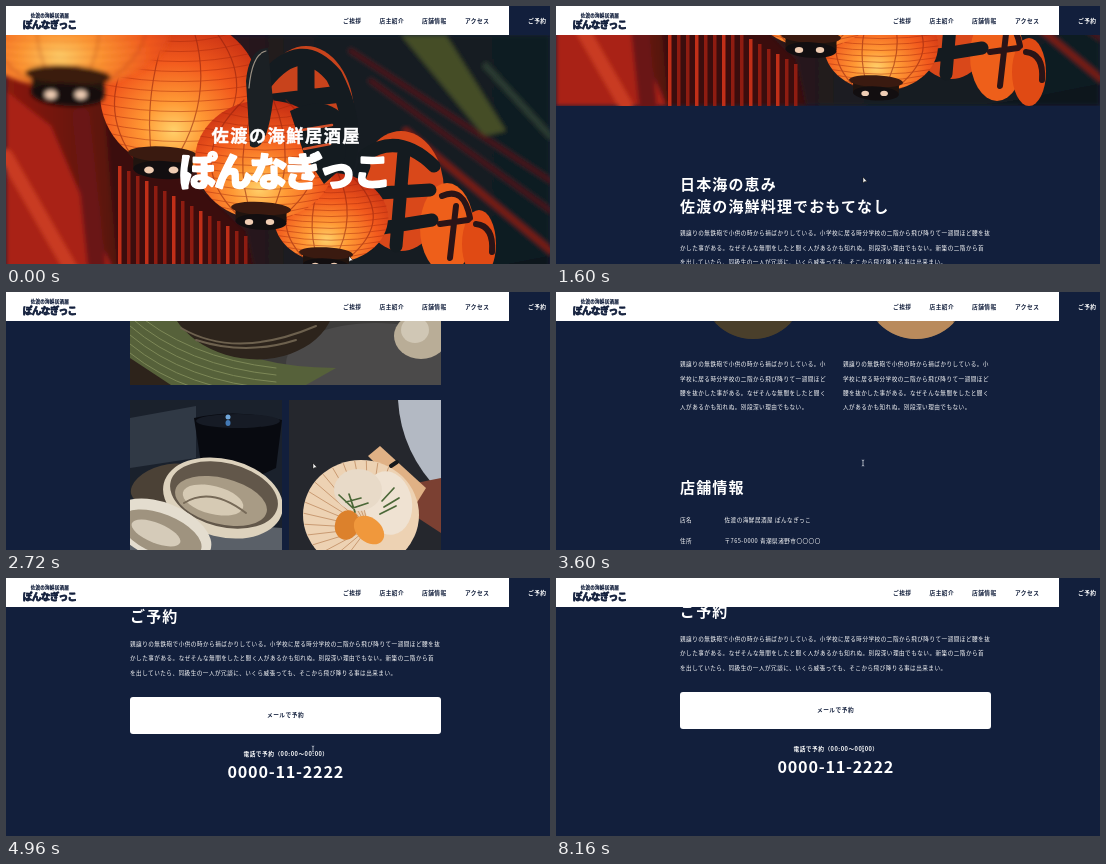
These frames come from a looping animation (544x258 px, 8240 ms). An HTML page:

```html
<!DOCTYPE html>
<html lang="ja">
<head>
<meta charset="utf-8">
<style>
html, body { margin: 0; width: 100%; height: 100%; overflow: hidden; background: #121f3c; }
svg { display: block; width: 544px; height: 258px; }
text { font-family: 'Noto Sans CJK JP', 'Noto Sans CJK', 'Noto Sans', sans-serif; white-space: pre; }
</style>
</head>
<body>
<svg id="stage" viewBox="0 0 544 258"></svg>
<script>
const NAVY = '#121f3c', WHITE = '#fff';
const SHOP = 'ぽんなぎっこ', KIND = '佐渡の海鮮居酒屋';
const STORY = '親譲りの無鉄砲で小供の時から損ばかりしている。小学校に居る時分学校の二階から飛び降りて一週間ほど腰を抜' +
  'かした事がある。なぜそんな無闇をしたと聞く人があるかも知れぬ。別段深い理由でもない。新築の二階から首' +
  'を出していたら、同級生の一人が冗談に、いくら威張っても、そこから飛び降りる事は出来まい。';

// y is the vertical middle of the glyphs
const text = (x, y, str, size = 5.6, gap = .49, weight = 500, fill = WHITE, stroke = 0) =>
  `<text x="${x}" y="${y + size * .38}" font-size="${size}" letter-spacing="${gap}" font-weight="${weight}"
    fill="${fill}" stroke="${fill}" stroke-width="${stroke}" stroke-linejoin="round">${str}</text>`;
const title = (y, str) => text(124, y, str, 15, 1.15, 700);
const ellipse = (x, y, rx, ry, fill, turn = 0) =>
  `<ellipse cx="${x}" cy="${y}" rx="${rx}" ry="${ry}" fill="${fill}" transform="rotate(${turn} ${x} ${y})"/>`;
const rect = (x, y, w, h, fill, extra = '') =>
  `<rect x="${x}" y="${y}" width="${w}" height="${h}" fill="${fill}" ${extra}/>`;
const shape = (d, fill) => `<path d="${d}" fill="${fill}"/>`;
const line = (d, color, width) =>
  `<path d="${d}" fill="none" stroke="${color}" stroke-width="${width}" stroke-linecap="round"/>`;
const soft = (blur, body) => `<g filter="url(#blur${blur})">${body}</g>`;
const clip = (id, outline, body) =>
  `<clipPath id="${id}">${outline}</clipPath><g clip-path="url(#${id})">${body}</g>`;
const lines = (x, y, cuts) =>
  cuts.slice(1).map((end, i) => text(x, y + i * 14.45, STORY.slice(cuts[i], end))).join('');
const repeat = (n, f) => Array.from({ length: n }, (_, i) => f(i)).join('');

function lantern(x, y, rx, ry, baseX, baseY, baseR) {
  const ribs = repeat(15, i => {
    const k = (i - 7) / 7.6, half = rx * Math.sqrt(1 - k * k), top = y + k * ry;
    return line(`M${x - half} ${top}Q${x} ${top + ry * .2} ${x + half} ${top}`, '#a3250c', .8);
  });
  const seams = [-.75, -.3, .3, .75].map(k =>
    line(`M${x + k * rx * .4} ${y - ry}Q${x + k * rx * 1.6} ${y} ${baseX + k * baseR} ${baseY}`, '#8d1f0d', 1.2)).join('');
  const lights = [-.4, .3].map(k =>
    ellipse(baseX + baseR * k, baseY + baseR * .2, baseR * .14, baseR * .1, '#f0cdb4')).join('');
  return ellipse(x, y, rx, ry, 'url(#glow)') + `<g opacity=".55">${ribs}${seams}</g>` +
    rect(baseX - baseR * .85, baseY - baseR * .3, baseR * 1.7, baseR * .5, '#20140f') +
    ellipse(baseX, baseY - baseR * .25, baseR, baseR * .22, '#3a1a10', 3) +
    ellipse(baseX, baseY + baseR * .2, baseR * .85, baseR * .26, '#120e10', 3) + lights;
}

function hero() {
  const slats = repeat(15, i => rect(112 + i * 9, 160 + i * 5, 3.5, 115, i % 3 ? '#8e1c11' : '#c02f18'));
  const back = rect(0, 29, 544, 243, 'url(#night)') +
    shape('M395 29L440 29L500 125L478 130Z', '#454d28') + line('M480 60L544 130', '#2c3a30', 7) +
    line('M345 45L545 175M365 75L545 205', '#4a171b', 5) + line('M400 125L545 245', '#7a1a17', 6) +
    shape('M0 85L45 120L110 272L0 272Z', '#a92417') + line('M0 150L70 272', '#c93a24', 14) +
    line('M75 110L92 272', '#6b1712', 18) + shape('M98 95L240 225L250 272L112 272Z', '#3a0f10') +
    shape('M430 272L544 250L544 272Z', '#0d151b');
  const marks = '#141b20';
  const right = ellipse(395, 185, 43, 60, '#d9481a') + ellipse(441, 222, 27, 45, '#ee5f1a') +
    ellipse(473, 238, 17, 34, '#e04a14') + ellipse(300, 108, 48, 68, '#c8431c') +
    line('M259 75Q295 30 328 70M268 96L335 88M300 52L300 165M268 125L338 118M328 70Q354 120 338 165', marks, 17) +
    line('M358 150Q392 125 428 160M356 188L424 184M398 145L390 240M358 160Q338 205 362 240M376 222L426 214', marks, 13) +
    line('M436 190Q458 180 464 212M434 218L462 214M450 200L444 252M470 218Q488 220 486 246', '#2a1417', 6);
  const front = lantern(174, 88, 80, 76, 157, 157, 35) + lantern(325, 212, 57, 45, 320, 254, 27) +
    lantern(259, 154, 70, 60, 255, 210, 30) +
    shape('M240 75Q243 42 262 42L267 95Q260 150 244 140Z', '#1b2024') + line('M243 82Q246 48 260 45', '#9c9285', 1.2) +
    shape('M284 105Q325 85 343 118L338 160L318 178L298 148Z', marks) +
    line('M290 125L326 119M298 143L324 138', '#d2502a', 2.5);
  return clip('heroBox', rect(0, 29, 544, 243, WHITE),
    soft(3, back) + soft(1, slats + right + front) + soft(3, lantern(62, 22, 103, 60, 62, 80, 43))) +
    text(205.5, 129, KIND, 17.2, 1.5, 900, WHITE, .5) +
    text(173, 165, SHOP, 38, -2.8, 900, WHITE, 2.6);
}

function dishes() {
  const veins = repeat(7, i => line(`M124 ${580 + i * 9}Q180 ${630 + i * 8} 270 ${640 + i * 7}`, '#7d8857', 1));
  const wide = rect(124, 450, 311, 207, '#3d3c3b') + ellipse(370, 635, 90, 40, '#4b4a4a') +
    shape('M124 540Q190 640 330 640L300 657L150 657L124 635Z', '#56613a') + veins +
    shape('M124 630L165 657L124 657Z', '#2d231b') +
    ellipse(245, 565, 85, 66, '#2d241c', 8) + ellipse(245, 548, 66, 42, '#8d806b', 12) +
    ellipse(248, 545, 48, 26, '#c3b59d', 12) + line('M175 600Q230 632 310 598M190 612Q240 628 290 612', '#6d614e', 2) +
    ellipse(415, 608, 27, 23, '#b9ad97') + ellipse(409, 602, 14, 13, '#d0c7b5');
  const oyster = rect(124, 672, 152, 152, '#1a212c') + shape('M124 690L190 678L190 730L124 740Z', '#303945') +
    shape('M188 690Q230 680 276 692L270 740Q230 762 195 735Z', '#080a10') + ellipse(232, 693, 42, 7, '#161b25') +
    ellipse(222, 689, 2.5, 2.5, '#6fa6da') + ellipse(222, 695, 2.5, 3, '#4379b5') +
    shape('M124 790L276 800L276 824L124 824Z', '#5a6068') + ellipse(160, 757, 36, 20, '#4b4136', -15) +
    ellipse(217, 770, 61, 39, '#ddd2bd', 14) + ellipse(218, 767, 55, 32, '#62574a', 14) +
    ellipse(215, 773, 47, 23, '#a89b85', 14) + ellipse(207, 772, 31, 14, '#d6cab4', 14) +
    line('M178 775Q205 758 240 785', '#776a58', 2) +
    ellipse(156, 803, 52, 28, '#e4ddcf', 22) + ellipse(155, 806, 43, 20, '#9f937f', 22) +
    ellipse(150, 805, 26, 10, '#d5cbb9', 22);
  const ridges = repeat(17, i => {
    const a = Math.PI * (.62 + i * .065);
    return line(`M362 800L${355 + 57 * Math.cos(a)} ${787 + 54 * Math.sin(a)}`, '#c99a72', 1);
  });
  const scallop = rect(283, 672, 152, 152, '#25272d') + shape('M392 672L435 672L435 765Q395 725 392 672Z', '#b3b9c3') +
    shape('M400 757L435 750L435 805L412 790Z', '#7b4032') + shape('M362 728L374 718L420 760L410 776Z', '#e0b185') +
    ellipse(355, 787, 58, 55, '#edd2b3') + ridges + ellipse(382, 775, 24, 32, '#efe2d2', -10) +
    ellipse(352, 762, 24, 21, '#e8dac8') + ellipse(341, 797, 12, 15, '#dc812c', 15) +
    ellipse(363, 802, 17, 12, '#f0983c', 40) +
    line('M333 767L347 780L362 775M343 766L349 784M340 774L355 770M376 773L388 760M378 779L393 770M374 786L390 778', '#4c6838', 1.7) +
    line('M385 738L391 734', '#15171b', 4);
  return clip('wide', rect(124, 450, 311, 207, WHITE), soft(1, wide)) +
    clip('left', rect(124, 672, 152, 152, WHITE), soft(1, oyster)) +
    clip('right', rect(283, 672, 152, 152, WHITE), soft(1, scallop));
}

function owner(x, id, wall, cloth) {
  return clip(id, ellipse(x, 987, 52, 52, WHITE), rect(x - 52, 935, 104, 104, wall) +
    soft(1, ellipse(x, 972, 17, 21, '#8c6650') + ellipse(x, 1035, 40, 38, cloth)));
}

function page() {
  const rows = [['店名', KIND + ' ' + SHOP], ['住所', '〒765-0000 青潮県渚野市〇〇〇〇'],
    ['電話番号', '0000-11-2222'], ['営業時間', '00:00〜00:00'], ['定休日', '〇曜日']];
  const map = rect(124, 1415, 311, 175, '#e4e6e3') +
    line('M124 1470L435 1520M210 1415L250 1590M124 1565L435 1440', WHITE, 7) + ellipse(279, 1500, 5, 5, '#c8372d');
  return hero() +
    title(350, '日本海の恵み') + title(372, '佐渡の海鮮料理でおもてなし') +
    lines(124, 399, [0, 51, 101, 146]) + dishes() +
    title(899, '店主紹介') + owner(197, 'host', '#3b352b', '#4a3f2b') + owner(360, 'chef', '#75604b', '#b98a5c') +
    lines(124, 1064, [0, 24, 48, 72, 93]) + lines(287, 1064, [0, 24, 48, 72, 93]) +
    title(1187, '店舗情報') +
    rows.map(([key, value], i) => text(124, 1220 + i * 21, key) + text(168.5, 1220 + i * 21, value)).join('') +
    title(1390, 'アクセス') + map +
    title(1665, 'ご予約') + lines(124, 1692.5, [0, 51, 101, 146]) +
    rect(124, 1746, 311, 37, WHITE, 'rx="3"') + text(261, 1764, 'メールで予約', 5.7, .5, 700, NAVY) +
    text(237.5, 1803, '電話で予約（00:00〜00:00）', 5.7, .5, 700) +
    text(221.5, 1820.5, '0000-11-2222', 16.2, .75, 700);
}

function header() {
  const nav = [[337, 'ご挨拶'], [373.5, '店主紹介'], [416, '店舗情報'], [459, 'アクセス']];
  return rect(0, 0, 544, 29, WHITE) + rect(503, 0, 41, 29, NAVY) +
    text(24.7, 9, KIND, 4.6, .2, 900, NAVY, .2) + text(16.8, 18, SHOP, 9.6, -.6, 900, NAVY, .8) +
    nav.map(([x, str]) => text(x, 14.8, str, 5.7, .45, 700, NAVY)).join('') +
    text(522, 14.8, 'ご予約', 5.7, .45, 700);
}

const blurs = [1, 3].map(n => `<filter id="blur${n}"><feGaussianBlur stdDeviation="${n * .7}"/></filter>`).join('');
stage.innerHTML = `<defs>${blurs}
  <radialGradient id="glow" cx=".46" cy=".74" r=".75"><stop stop-color="#ffd06a"/><stop offset=".25" stop-color="#ff9a35"/>
    <stop offset=".6" stop-color="#f25a1d"/><stop offset="1" stop-color="#c42c12"/></radialGradient>
  <linearGradient id="night"><stop stop-color="#8a1a10"/><stop offset=".3" stop-color="#3d1012"/>
    <stop offset=".55" stop-color="#1a1d22"/><stop offset="1" stop-color="#0f1a22"/></linearGradient></defs>
  <g id="sheet">${page()}</g>${header()}
  <g id="pointer"><path id="arrow" d="M0 0L0 6L1.6 4.7L4 4.4Z" fill="#fff" stroke="#111" stroke-width=".6"/>
  <path id="beam" d="M-1.2 -3Q0 -3 0 -2V2Q0 3 -1.2 3M1.2 -3Q0 -3 0 -2M0 2Q0 3 1.2 3" fill="none" stroke="#dfe3ea" stroke-width=".7"/></g>`;

const LOOP = 8240, STEP = 80;
const keys = [[640, 0], [960, 62], [1600, 172], [2720, 564], [3600, 992], [4960, 1627], [5360, 1632]];
const slopes = keys.slice(1).map(([t, y], i) => (y - keys[i][1]) / (t - keys[i][0]));
const tangent = i => {
  const a = slopes[i - 1], b = slopes[i];
  return a && b ? 2 * a * b / (a + b) : 0;
};

// smooth curve through the keys that never turns back
function scrollAt(t) {
  if (t <= keys[0][0]) return 0;
  const i = keys.findIndex(k => k[0] > t) - 1;
  if (i < 0) return keys.at(-1)[1];
  const [t0, y0] = keys[i], [t1, y1] = keys[i + 1], d = t1 - t0, u = (t - t0) / d, v = 1 - u;
  return y0 * v * v * (1 + 2 * u) + y1 * u * u * (3 - 2 * u) + d * u * v * (v * tangent(i) - u * tangent(i + 1));
}

function draw(now) {
  const t = Math.floor(now % LOOP / STEP) * STEP;
  const p = Math.min(t / 560, 1), k = p * p * (3 - 2 * p), overText = t >= 3200;
  sheet.setAttribute('transform', `translate(0 ${-Math.round(scrollAt(t))})`);
  pointer.setAttribute('transform', `translate(${343 - 36 * k} ${250 - 79 * k})`);
  arrow.setAttribute('opacity', overText ? 0 : 1);
  beam.setAttribute('opacity', overText ? 1 : 0);
}

const start = performance.now();
function tick() {
  draw(performance.now() - start);
  requestAnimationFrame(tick);
}
tick();
</script>
</body>
</html>
```
